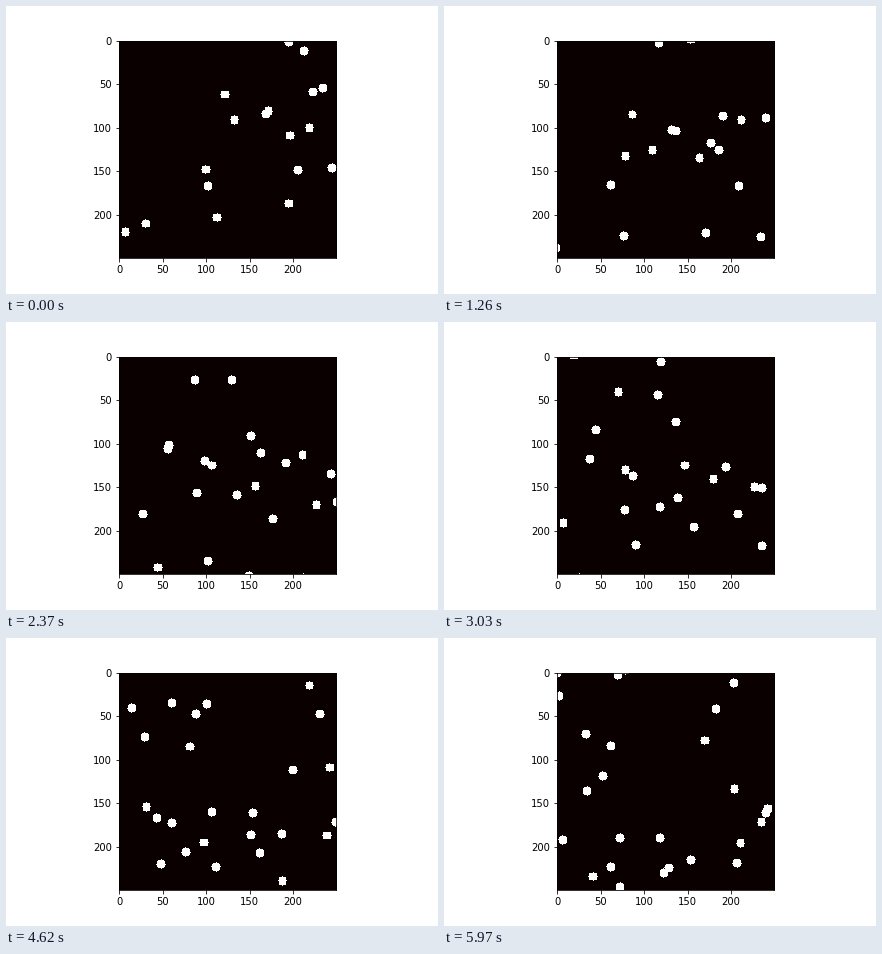
Write a matplotlib script that moves like this. It is 432x288 px and loops after 6000 ms.

```python
import numpy as np
import matplotlib.pyplot as plt
from matplotlib.animation import FuncAnimation

SIZE = 250
RADIUS = 5
STEPS = 200
ARRIVALS = 24

# Discs on the field at the start: x, y, degrees below straight left
OPENING = [
    (194, 2, -50), (212, 12, -50), (233, 55, 58), (222, 59, 41),
    (121, 62, 34), (168, 84, 27), (171, 81, 34), (132, 91, 57),
    (218, 100, 38), (196, 109, 39), (99, 148, 25), (205, 149, -47),
    (244, 146, 30), (102, 167, -55), (194, 187, 55), (112, 203, 30),
    (30, 210, 41), (7, 220, 40),
]


def velocity(heading):
    """One cell per step, drifting left."""
    angle = np.radians(heading)
    return np.array([-np.cos(angle), np.sin(angle)])


def arrival(rng, step):
    """Start point and velocity of a disc that enters the field at a step."""
    rising = rng.random() < 0.18
    v = velocity(-rng.uniform(43, 67) if rising else rng.uniform(25, 57))
    along = rng.uniform(0, SIZE)
    if rng.random() < abs(v[0]) / np.abs(v).sum():
        entry = (SIZE + RADIUS, along)
    else:
        entry = (along, SIZE + RADIUS if rising else -RADIUS)
    return entry - v * step, v


rng = np.random.default_rng(7)
discs = [(np.array([x, y]), velocity(a)) for x, y, a in OPENING]
discs += [arrival(rng, step) for step in np.linspace(4, STEPS - 4, ARRIVALS)]
rows, cols = np.ogrid[:SIZE, :SIZE]


def field(step):
    """Grid with ones wherever a disc covers the cell."""
    grid = np.zeros((SIZE, SIZE))
    for start, v in discs:
        x, y = np.round(start + v * step)
        grid[(cols - x) ** 2 + (rows - y) ** 2 <= RADIUS ** 2] = 1
    return grid


plt.rcParams.update({"font.family": "DejaVu Sans", "font.size": 10})
fig, ax = plt.subplots(figsize=(6, 4), dpi=72)
fig.subplots_adjust(left=0.125, right=0.9, bottom=0.125, top=0.88)
image = ax.imshow(field(0), cmap="hot", vmin=0, vmax=1,
                  interpolation="nearest")


def update(step):
    image.set_data(field(step))
    return (image,)


anim = FuncAnimation(fig, update, frames=STEPS, interval=30,
                     repeat=True, repeat_delay=0)
plt.show()
```
